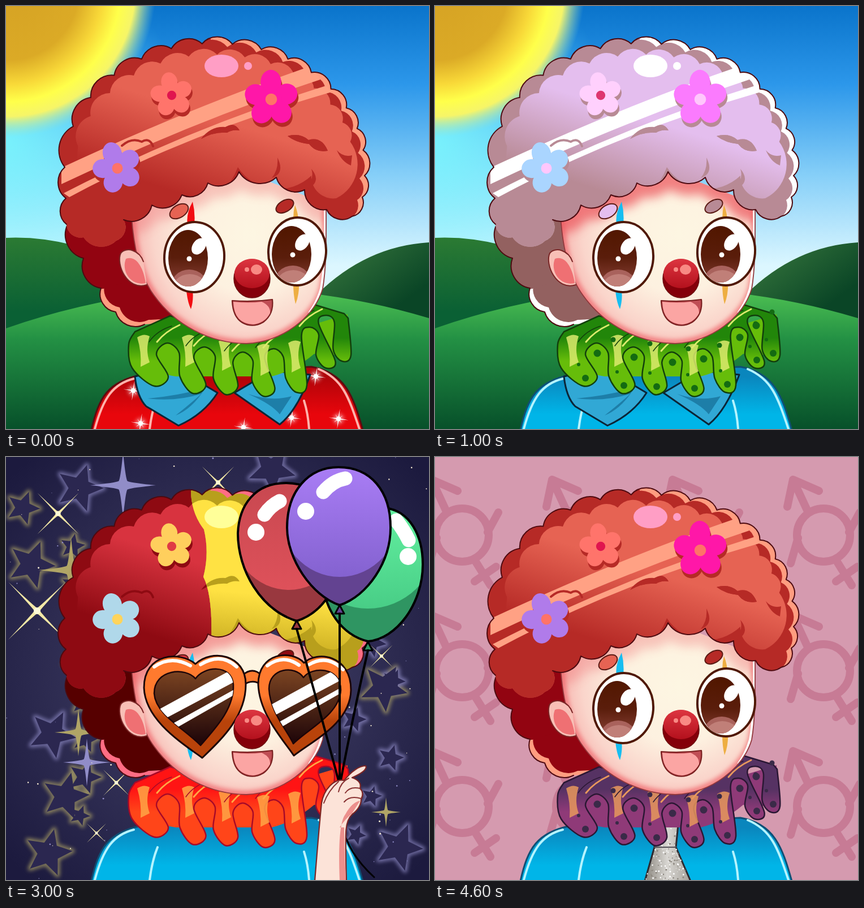
An HTML page that plays this animation: 748x748 px, repeating every 5000 ms.

```html
<!DOCTYPE html>
<html lang="en">
<head>
<meta charset="utf-8">
<title>Clown portraits</title>
<style>
html, body { margin: 0; width: 100%; height: 100%; overflow: hidden; }
svg { display: block; width: 100vw; height: 100vh; animation: looks 5s step-end infinite; }
path, ellipse { stroke-linecap: round; stroke-linejoin: round; }
</style>
</head>
<body>
<svg id="stage" viewBox="0 0 748 748" preserveAspectRatio="none"></svg>
<script>
// Each part has a few variants; "order" picks one for each second.
const closet = [
  { order: '01230', colors: {
    hair: '#e66353 #e4beee #e38b90 #d8333f', shade: '#b62a26 #b88a95 #b64765 #8e0a12',
    deep: '#920411 #936160 #8e223a #560000', rim: '#ff9d80 #fff #ffffb9 #ff6d84',
    blob: '#ff9ec5 #fff #ffffdc #ffff99', stripe: '#ffa184 #fff #ffffb3 #ffffb3',
    petal1: '#b07bea #aad5ff #abb5f5 #b0d8ea', core1: '#ff7368 #ffc7fc #ffa09c #ffd45c',
    petal2: '#ff746b #ffd0fd #ffa09c #ffcf5d', core2: '#e0154f #de3670 #d9127d #e03a45',
    petal3: '#ff17a8 #fb7bfe #ff36d4 #ff36d4', blush: '.3 .75 .65 .55' } },
  { order: '01211', colors: {
    paint: '#f20d12 #17bdf0 #0c5566', coat: '#e8060c #00b5e8 #094b5a',
    coatDark: '#b00409 #0a86bd #062f3d', coatRim: '#ffb3ac #b5f4ff #b8dbe0', coatLine: '#5c0b10 #0e4f74 #06222c' } },
  { order: '00112', colors: {
    ruffTop: '#22860a #ff1414 #563263', ruff: '#66bd0a #ff4519 #8f3a78', ruffLit: '#dcea6e #ffa646 #e8985c',
    ruffLine: '#123f0c #a80a28 #2a1733', spot: '#146b12 #146b12 #3a2a48' } },
  { order: '00011', colors: {
    frame: '#b71f31 #ff7a2e', frameDark: '#6e0a16 #b8430a', lens: '#5f2a34 #7d4522', glare: '#ffe6ee #fff',
    night: '#54303e #36345a', nightEdge: '#3f1424 #1c1a3e', starFill: '#4a2030 #2b2750',
    glowA: '#c792a8 #918dc8', glowB: '#b5ad80 #b0a566' } }
];
const shown = { sky: '01', stars: '23', pink: '4', eyes: '014', shades: '23', bow: '01', tie: '4',
  spots: '14', few: '0', many: '2', party: '3', band: '0124' };

const frames = [0, 1, 2, 3, 4].map(i => {
  const rules = closet.flatMap(({ order, colors }) =>
    Object.entries(colors).map(([k, list]) => `--${k}:${list.split(' ')[order[i]]}`));
  for (const k in shown) rules.push(`--on-${k}:${+shown[k].includes(i)}`);
  return `${i * 20}%{${rules.join(';')}}`;
});
document.head.appendChild(document.createElement('style')).textContent = `@keyframes looks{${frames.join('')}}`;

const v = name => `var(--${name})`;
const pairs = s => s.split(',').map(p => p.trim().split(' ').map(Number));
const path = (d, fill = 'none', line = 'none', w = 2, extra = '') =>
  `<path d="${d}" style="fill:${fill};stroke:${line};stroke-width:${w}" ${extra}/>`;
const oval = (x, y, rx, ry, fill, rot = 0, line = 'none', w = 2) =>
  `<ellipse cx="${x}" cy="${y}" rx="${rx}" ry="${ry}" transform="rotate(${rot} ${x} ${y})" style="fill:${fill};stroke:${line};stroke-width:${w}"/>`;
const dot = (x, y, r, fill) => oval(x, y, r, r, fill);
const show = (name, body) => `<g style="opacity:var(--on-${name})">${body}</g>`;
const soft = (body, alpha = 1, id = 'soft') => `<g filter="url(#${id})" style="opacity:${alpha}">${body}</g>`;
const grad = (type, id, at, ...stops) =>
  `<${type}Gradient id="${id}" gradientUnits="userSpaceOnUse" ${at}>` + stops.map(([o, c, a = 1]) =>
    `<stop offset="${o}" style="stop-color:${c};stop-opacity:${a}"/>`).join('') + `</${type}Gradient>`;
const line = (x1, y1, x2, y2) => `x1="${x1}" y1="${y1}" x2="${x2}" y2="${y2}"`;
const disc = (x, y, r) => `cx="${x}" cy="${y}" r="${r}"`;

let clips = '', clipCount = 0;
function within(shape, body) {
  const id = 'clip' + clipCount++;
  clips += `<clipPath id="${id}"><path d="${shape}"/></clipPath>`;
  return `<g clip-path="url(#${id})">${body}</g>`;
}
let seed = 7;
const rnd = (a = 0, b = 1) => a + (b - a) * (seed = seed * 16807 % 2147483647) / 2147483647;
const repeat = (n, make) => Array.from({ length: n }, (_, i) => make(i)).join('');

// Rounded bumps between successive points.
function bumps(pts, k = 0.65) {
  return pts.map(([x, y], i) => {
    if (!i) return `M${x} ${y}`;
    const r = k * Math.hypot(x - pts[i - 1][0], y - pts[i - 1][1]);
    return `A${r} ${r} 0 0 1 ${x} ${y}`;
  }).join('');
}
// Smooth curve through all points.
function curve(pts) {
  let d = `M${pts[0]}`;
  for (let i = 0; i < pts.length - 1; i++) {
    const [a, b, c, e] = [pts[i - 1] || pts[i], pts[i], pts[i + 1], pts[i + 2] || pts[i + 1]];
    d += `C${b.map((n, j) => n + (c[j] - a[j]) / 6)} ${c.map((n, j) => n - (e[j] - b[j]) / 6)} ${c}`;
  }
  return d;
}
function star(x, y, r, rot) {
  let d = '';
  for (let i = 0; i < 10; i++) {
    const a = rot + i * Math.PI / 5, q = i % 2 ? r * 0.45 : r;
    d += `${i ? 'L' : 'M'}${x + q * Math.sin(a)} ${y - q * Math.cos(a)}`;
  }
  return d + 'Z';
}
// Four-pointed sparkle; "fat" is the half-width of its waist.
function spark(x, y, r, fill, rot = 0, fat = 0.05) {
  const q = r * fat, s = q * 1.6, t = q * 0.6;
  return path(`M0 ${-r}Q${t} ${-s} ${q} ${-q}Q${s} ${-t} ${r} 0Q${s} ${t} ${q} ${q}Q${t} ${s} 0 ${r}` +
    `Q${-t} ${s} ${-q} ${q}Q${-s} ${t} ${-r} 0Q${-s} ${-t} ${-q} ${-q}Q${-t} ${-s} 0 ${-r}Z`,
    fill, 'none', 0, `transform="translate(${x} ${y}) rotate(${rot})"`);
}
const glint = (x, y, r) => soft(dot(x, y, r * 0.6, '#fff'), 0.5) +
  spark(x, y, r * 1.2, '#fff', 8, 0.08) + spark(x, y, r * 0.7, '#fff', 53, 0.08) + dot(x, y, r * 0.28, '#fff');

// Backgrounds
const sky = path('M0 0H748V748H0Z', 'url(#sky)') + path('M0 0H748V748H0Z', 'url(#cyan)') +
  path('M0 0H300V300H0Z', 'url(#sun)') +
  path('M0 410Q110 405 230 465V600H0Z', 'url(#hillL)') +
  path('M540 520Q630 425 748 418V600H540Z', 'url(#hillR)') +
  path('M0 570Q374 440 748 552V748H0Z', 'url(#hill)');

const glow = i => v(i % 2 ? 'glowB' : 'glowA');
const bigStars = pairs('130 55,105 600,470 22,45 190,82 490,668 408,670 228,75 700,695 690').map(([x, y]) => [x, y, 43]);
const smallStars = Array.from({ length: 18 }, (_, i) =>
  [i % 2 ? rnd(600, 725) : rnd(30, 150), 90 + i * 34, rnd(12, 32)]);
const starPaths = [...bigStars, ...smallStars].map(([x, y, r]) => star(x, y, r, rnd(0.1, 0.6)));
const night = path('M0 0H748V748H0Z', 'url(#night)') +
  soft(starPaths.map((d, i) => path(d, 'none', glow(i), 7)).join(''), 0.8) +
  starPaths.map(d => path(d, v('starFill'))).join('') +
  pairs('207 50,115 200,143 540,128 487,680 155,672 628').map(([x, y], i) =>
    spark(x, y, 58 - (i >> 1) * 16, glow(i), 0, 0.13)).join('') +
  pairs('55 272,92 100,375 45,195 576,664 352,160 665,548 102').map(([x, y], i) =>
    spark(x, y, 72 / (1 + i * 0.4), '#f3e8a6', 45) + dot(x, y, 6 / (1 + i * 0.3), '#fffbd8')).join('') +
  repeat(110, i => dot(rnd(0, 748), rnd(0, 748), rnd(0.5, 1.5), i % 2 ? '#fff3d8' : v('glowA')));

const symbol = 'M47 0A47 47 0 1 1 -47 0A47 47 0 1 1 47 0M-28 -42L-54 -98L-8 -78M-54 -98L-64 -50M45 -5L64 -40M-45 5L-58 50M22 44L50 89M22 82L60 56';
const pink = path('M0 0H748V748H0Z', '#d59aaf') + repeat(12, i =>
  path(symbol, 'none', '#c77b95', 14, `transform="translate(${48 + i % 4 * 213} ${138 + (i >> 2) * 240})"`));

// Hair: bumps spread over a dome, denser to the right.
const dome = (rx, ry, phase, n = 14) => Array.from({ length: n + 1 }, (_, i) => {
  const a = Math.PI * (1 - 0.956 * ((i + phase) / 14) ** 0.83);
  return [369 + rx * Math.cos(a), 285 - ry * Math.sin(a)];
});
const fringe = pairs('567 360,528 325,478 303,412 293,357 313,311 334,258 352,208 378');
const crown = [...pairs('107 386,106 340'), ...dome(265, 219, 0), ...pairs('634 300,630 338,612 372'), ...fringe];
const crownLine = bumps(crown);
const crownShape = bumps([...crown, [195, 415], [137, 409], [107, 386]]) + 'Z';
const innerShape = bumps([...dome(246, 199, 0.5, 13), ...pairs('584 340,540 300,410 285,240 345,120 335')]) + 'Z';
const backLine = bumps(pairs('245 563,194 541,168 499,137 446,109 386'));
const backShape = backLine + 'L240 360L300 560Z';
const curls = 'M498 230Q520 224 535 237Q558 230 569 256Q548 260 536 244Q514 242 498 230Z' +
  'M345 235Q362 212 388 214Q404 204 413 220Q400 218 391 224Q368 222 345 235Z';
const tufts = curls + 'M540 288Q546 305 530 325Q560 312 540 288ZM480 268Q482 290 470 304Q494 296 480 268Z' +
  'M585 255Q596 268 612 264L610 282Q594 276 585 255Z';
const mop = (fill, shade) => path(crownShape, v('rim')) +
  path(crownShape, shade, 'none', 0, 'transform="translate(-9 5)"') +
  path('M90 40H362V280H540V430H90Z', shade) + path(innerShape, fill) + path(tufts, shade);

function flower(x, y, s, turn, petal, core) {
  const petals = fill => repeat(5, i => {
    const deg = turn + i * 72, a = deg * Math.PI / 180, d = s * (i ? 0.6 : 0.64);
    return oval(x + d * Math.cos(a), y + d * Math.sin(a), s * (i ? 0.42 : 0.47), s * 0.39, fill, deg);
  }) + dot(x, y, s * 0.4, fill);
  return `<g transform="translate(2 7)">${petals(v('shade'))}</g>` + petals(v(petal)) + dot(x, y, s * 0.22, v(core));
}
const blondSide = 'M328 40Q322 92 350 128Q360 170 349 212Q366 245 363 330V400H700V40Z';
const hair = within(crownShape, mop('url(#hair)', v('shade')) +
  show('party', within(blondSide, mop('url(#blond)', '#b89f1c'))) +
  show('band', path('M98 286Q330 178 540 106L556 130Q330 205 98 315Z', v('stripe')) +
    path('M102 331Q320 218 566 141L576 152Q320 226 112 338Z', v('stripe')) +
    path(curls, v('shade')))) +
  path('M205 247Q222 232 240 240Q254 232 260 248', 'none', v('shade'), 4) +
  path(crownLine, 'none', '#4d0a10') +
  oval(381, 106, 30, 20, v('blob')) + show('band', dot(428, 106, 7, v('blob'))) +
  flower(197, 287, 43, -109, 'petal1', 'core1') + flower(293, 158, 37, -100, 'petal2', 'core2') +
  show('band', flower(469, 165, 47, -91, 'petal3', 'core1'));
const back = within(backShape, path(backShape, v('rim')) +
  path(backShape, v('deep'), 'none', 0, 'transform="translate(7 -8)"') +
  path('M90 360H240V480L172 500H90Z', v('deep'))) + path(backLine, 'none', '#4d0a10');

// Clothes
const coat = path('M151 750C164 692 180 664 240 652L540 638C600 648 614 690 631 750Z', 'url(#coat)', v('coatLine'), 3) +
  path('M157 748C172 692 190 668 226 659M553 642C596 660 606 692 625 748M268 690Q258 715 254 748M527 698Q534 720 536 748',
    'none', v('coatRim'), 4);
const few = pairs('225 680,238 738,420 745,505 728,548 655,588 730').map(([x, y]) => glint(x, y, 15)).join('');
const many = repeat(24, i => glint(190 + i * 17.5, 675 + i * 29 % 70, 7 + i * 5 % 11));
const bow = path('M228 655Q232 692 248 708L305 742Q350 722 374 684L300 640Z', '#31a8d5', '#0b2537', 3) +
  path('M404 684L484 740Q515 715 538 652L470 645Z', '#31a8d5', '#0b2537', 3) +
  path('M250 694Q300 690 352 676Q330 712 300 724Q330 700 345 686Q300 700 250 694ZM428 686Q470 700 505 690L484 722Q470 704 428 686Z', '#1d7ea8');
const tieShape = 'M388 650H430L426 690L452 750H371L388 690Z';
const tie = path(tieShape, 'url(#tie)', '#2c2a30', 3) + within(tieShape, repeat(260, i =>
  dot(rnd(370, 454), rnd(640, 748), rnd(0.5, 1.6), i % 5 < 3 ? '#fff' : '#8d8880'))) +
  path('M388 690H426', 'none', '#55525a');

// Ruff: a ribbon that swings between hanging lobes and the curls above them.
const lobes = pairs('262 672,330 685,388 687,455 690,513 683,565 640,594 628');
const folds = pairs('285 596,350 603,418 612,473 606,537 568,566 547');
const ribbon = pairs('228 576,217 598,223 640');
lobes.forEach(([x, y], i) => {
  const s = 1 - i * 0.06, fold = folds[i];
  if (i) ribbon.push([x - 24 * s, y - 32 * s]);
  ribbon.push([x, y], [x + 25 * s, y - 16 * s]);
  if (fold) ribbon.push([fold[0] - 19 * s, fold[1] + 20 * s], fold, [fold[0] + 21 * s, fold[1] + 17 * s]);
});
const edge = curve([...ribbon, [605, 552]]);
const ruff = path('M225 610Q300 560 420 600L604 545V612Q570 622 545 615Q510 645 470 655H300L245 645Z', v('ruff')) +
  path(edge + 'L598 544L545 528L420 580L290 548Z', 'url(#ruff)', v('ruffLine'), 2.5) +
  [[206, 596], ...folds.slice(0, 4)].map(([x, y]) =>
    path(`M${x + 26} ${y - 10}q12 -8 22 -2q-8 24 0 46l-16 8q2 -26 -6 -52Z`, v('ruffLit'), 'none', 0, 'opacity=".85"')).join('') +
  folds.slice(0, 5).map(([x, y]) => path(`M${x - 18} ${y - 2}q14 -18 40 -30`, 'none', v('ruffLit'), 3) +
    path(`M${x - 32} ${y - 2}q14 -20 40 -28`, 'none', v('ruffLine'), 1.5)).join('') +
  show('spots', lobes.map(([x, y]) => dot(x + 4, y - 14, 6, v('spot')) + dot(x - 8, y - 38, 3, v('spot'))).join('') +
    folds.map(([x, y]) => dot(x + 2, y + 18, 6.5, v('spot')) + dot(x + 30, y - 6, 4.5, v('spot'))).join(''));

// Face
const jaw = 'M222 372C226 430 238 480 262 512C300 565 360 596 425 597C490 594 545 550 560 500C567 460 566 410 566 350';
const faceShape = jaw + 'L400 285Z';
const face = path(faceShape, 'url(#skin)') + within(faceShape,
    soft(path(jaw, 'none', '#f0696e', 14), 0.7) +
    soft(path(bumps(fringe), 'none', '#ec5a60', 42), v('blush'), 'blur') +
    path('M565 360Q567 450 558 500Q552 522 538 542', 'none', '#fff', 6)) +
  path(jaw, 'none', '#92383c', 1.8) +
  path('M249 493C214 504 194 456 203 437C213 425 236 432 243 452', '#f8bfb6', '#7a2626') +
  path('M212 447C230 440 243 462 247 490C222 496 203 470 212 447Z', '#ef7073') +
  path('M330 346Q318 368 321 386H333Q335 366 330 346ZM319 503Q321 524 327 536Q332 520 330 503Z', v('paint')) +
  path('M511 352Q507 366 509 382H517Q517 366 511 352ZM508 490Q508 512 512 527Q519 510 518 488Z', '#eeae42') +
  oval(306, 363, 18, 11, v('hair'), -32, '#5a1a14') + oval(493, 354, 17, 10, v('shade'), -30, '#5a1a14');

function eye(x, y, r, ix, iy) {
  const iris = `M${ix - 35} ${iy}a35 50 0 1 1 70 0a35 50 0 1 1 -70 0Z`;
  return oval(x, y, r, r + 9, '#fff', 4, '#4f1804', 4) + path(iris, 'url(#iris)') +
    within(iris, dot(ix + 2, iy + 54, 34, '#a9625c') + dot(ix + 3, iy + 62, 34, '#c07f78')) +
    oval(ix + 19, iy - 21, 11, 16, '#fff', 35) + dot(ix + 2, iy + 1, 4.5, '#fff');
}
const eyes = eye(333, 444, 53, 322, 446) + eye(515, 434, 51, 505, 439);
const nose = oval(435, 482, 32, 34, '#84000a', 0, '#6d0a10', 1.5) + oval(435, 473, 31, 26, 'url(#nose)') +
  oval(443, 466, 10, 9, '#f88a84') + dot(426, 466, 4, '#f88a84');
const mouth = path('M400 521Q436 524 471 519Q474 545 455 559Q436 570 418 560Q401 550 400 521Z', '#c04e55', '#7a2020', 2.2) +
  path('M402 523Q430 526 452 523Q468 530 467 543Q458 560 438 563Q403 562 402 523Z', '#fba5a3');

// Heart glasses
function heart(rim, lens, dx) {
  return path(rim, 'url(#frame)', '#1c0508', 3) + path(lens, 'url(#lens)', '#1c0508', 2.5) +
    within(lens, path('M262 451L410 370L420 389L275 466ZM290 474L420 402L424 409L296 482Z', v('glare'), 'none', 0,
      `transform="translate(${dx})"`));
}
const shades = path('M418 386Q436 370 452 386L450 402Q436 392 420 403Z', v('frame'), '#1c0508', 3) +
  heart('M335 366C308 343 244 346 244 408C246 465 310 505 347 532C380 500 424 460 424 402C424 350 365 338 335 366Z',
    'M335 392C318 371 262 375 262 418C264 455 315 480 344 510C370 480 404 445 402 402C398 365 350 370 335 392Z', 0) +
  heart('M527 364C505 340 446 345 446 402C448 455 490 500 509 528C545 500 609 470 610 412C610 350 550 342 527 364Z',
    'M526 390C512 368 465 372 465 410C467 450 495 480 508 507C535 480 590 455 592 412C592 370 540 370 526 390Z', 183) +
  path('M262 371Q292 350 326 369M344 367Q380 345 408 371M462 369Q490 348 518 368M536 367Q568 348 596 376', 'none', '#fff', 6);

// Balloons and hand
function balloon(shape, dark, lit, [x, y, rx, ry], streak, [sx, sy], [kx, ky]) {
  return path(shape, dark) + within(shape, oval(x, y, rx, ry, `url(#${lit})`)) + path(shape, 'none', '#000', 4) +
    path(streak, 'none', '#fff', 25) + dot(sx, sy, 15, '#fff') + path(`M${kx} ${ky}l-8 15h16Z`, dark, '#000', 3);
}
const party =
  balloon('M640 326C595 315 560 270 560 210C560 140 620 85 670 90C715 95 737 140 737 190C737 260 690 322 640 326Z',
    '#2f9562', 'green', [640, 150, 120, 118], 'M690 112Q704 130 712 147', [711, 176], [640, 327]) +
  balloon('M514 290C450 270 410 200 410 135C412 85 440 46 495 46C560 46 590 100 590 170C590 230 560 275 514 290Z',
    '#99383f', 'red', [500, 120, 105, 115], 'M457 102Q468 86 484 78', [442, 133], [514, 289]) +
  balloon('M590 262C540 245 497 180 497 125C497 60 535 18 588 18C645 18 680 60 680 125C680 185 640 245 590 262Z',
    '#634391', 'purple', [590, 90, 110, 122], 'M561 62Q578 42 600 38', [530, 96], [590, 262]) +
  path('M514 304Q550 430 588 572M590 277V572M640 342Q615 450 592 572', 'none', '#000', 4) +
  path('M594 650Q604 700 651 743', 'none', '#000', 3) +
  path('M546 750C550 700 554 650 558 612C562 588 580 568 598 572C610 556 625 546 636 546C640 552 628 560 612 567Q630 573 626 586Q634 594 628 605Q628 620 612 632C598 645 600 665 602 750Z', '#fce3d8', '#7a2626', 2.2) +
  path('M590 655Q600 640 612 630L626 608Q612 610 600 632Q586 650 590 748H601Q598 690 598 655Z', '#ec8f8c') +
  path('M588 574Q570 590 562 612M606 568Q592 575 588 592M626 586Q608 582 600 594M628 604Q608 598 598 610', 'none', '#8a3434');

const gradients = grad('linear', 'sky', line(0, 0, 0, 460), [0, '#0a74cb'], [0.3, '#2c97ea'], [0.65, '#86cff8'], [1, '#dcf7ff']) +
  grad('radial', 'cyan', disc(0, 240, 330), [0, '#7dffff', 0.8], [1, '#7dffff', 0]) +
  grad('radial', 'sun', disc(3, -30, 262), [0, '#d5a224'], [0.48, '#dbaa26'], [0.64, '#f8d838'], [0.76, '#ffff4a'], [0.86, '#f6f568'], [1, '#9fe0c0', 0]) +
  grad('linear', 'hillL', line(0, 410, 0, 540), [0, '#2b7a33'], [1, '#0a6034']) +
  grad('linear', 'hillR', line(600, 430, 680, 540), [0, '#31703a'], [1, '#0a4526']) +
  grad('linear', 'hill', line(0, 505, 0, 748), [0, '#4dc052'], [0.35, '#239044'], [1, '#07502a']) +
  grad('radial', 'night', disc(374, 374, 500), [0.4, v('night')], [1, v('nightEdge')]) +
  grad('linear', 'hair', line(400, 190, 350, 345), [0.1, v('hair')], [1, v('shade')]) +
  grad('linear', 'blond', line(440, 200, 425, 340), [0.3, '#ffe243'], [1, '#c9ac20']) +
  grad('linear', 'coat', line(0, 655, 0, 722), [0, v('coatDark')], [1, v('coat')]) +
  grad('linear', 'tie', line(372, 0, 450, 0), [0, '#8c8880'], [0.5, '#d8d6d2'], [1, '#a7a39c']) +
  grad('linear', 'ruff', line(0, 560, 0, 650), [0.3, v('ruffTop')], [0.75, v('ruff')]) +
  grad('radial', 'skin', disc(430, 405, 225), [0, '#fdf6e2'], [0.45, '#fdf1e0'], [0.75, '#fad5cb'], [1, '#f5a8a4']) +
  grad('linear', 'iris', line(0, 395, 0, 495), [0, '#521700'], [0.5, '#5a1d0b'], [1, '#8a4238']) +
  grad('linear', 'nose', line(0, 448, 0, 500), [0, '#dc3540'], [1, '#b3101c']) +
  grad('linear', 'frame', line(0, 350, 0, 530), [0.4, v('frame')], [0.65, v('frameDark')]) +
  grad('linear', 'lens', line(0, 375, 0, 500), [0, v('lens')], [1, '#22080a']) +
  grad('linear', 'green', line(0, 90, 0, 270), [0, '#63f0a0'], [1, '#48cd86']) +
  grad('linear', 'red', line(0, 46, 0, 235), [0, '#c84850'], [1, '#de515a']) +
  grad('linear', 'purple', line(0, 18, 0, 212), [0, '#a97df5'], [1, '#8462d0']);
const filters = '<filter id="soft" x="-50%" y="-50%" width="200%" height="200%"><feGaussianBlur stdDeviation="3.5"/></filter>' +
  '<filter id="blur" x="-20%" y="-80%" width="140%" height="260%"><feGaussianBlur stdDeviation="9"/></filter>';

document.getElementById('stage').innerHTML = `<defs>${gradients + clips + filters}</defs>` +
  show('sky', sky) + show('stars', night) + show('pink', pink) +
  back + coat + show('few', few) + show('many', many) + show('bow', bow) + show('tie', tie) +
  ruff + face + show('eyes', eyes) + hair + show('shades', shades) + nose + mouth + show('party', party);
</script>
</body>
</html>
```
